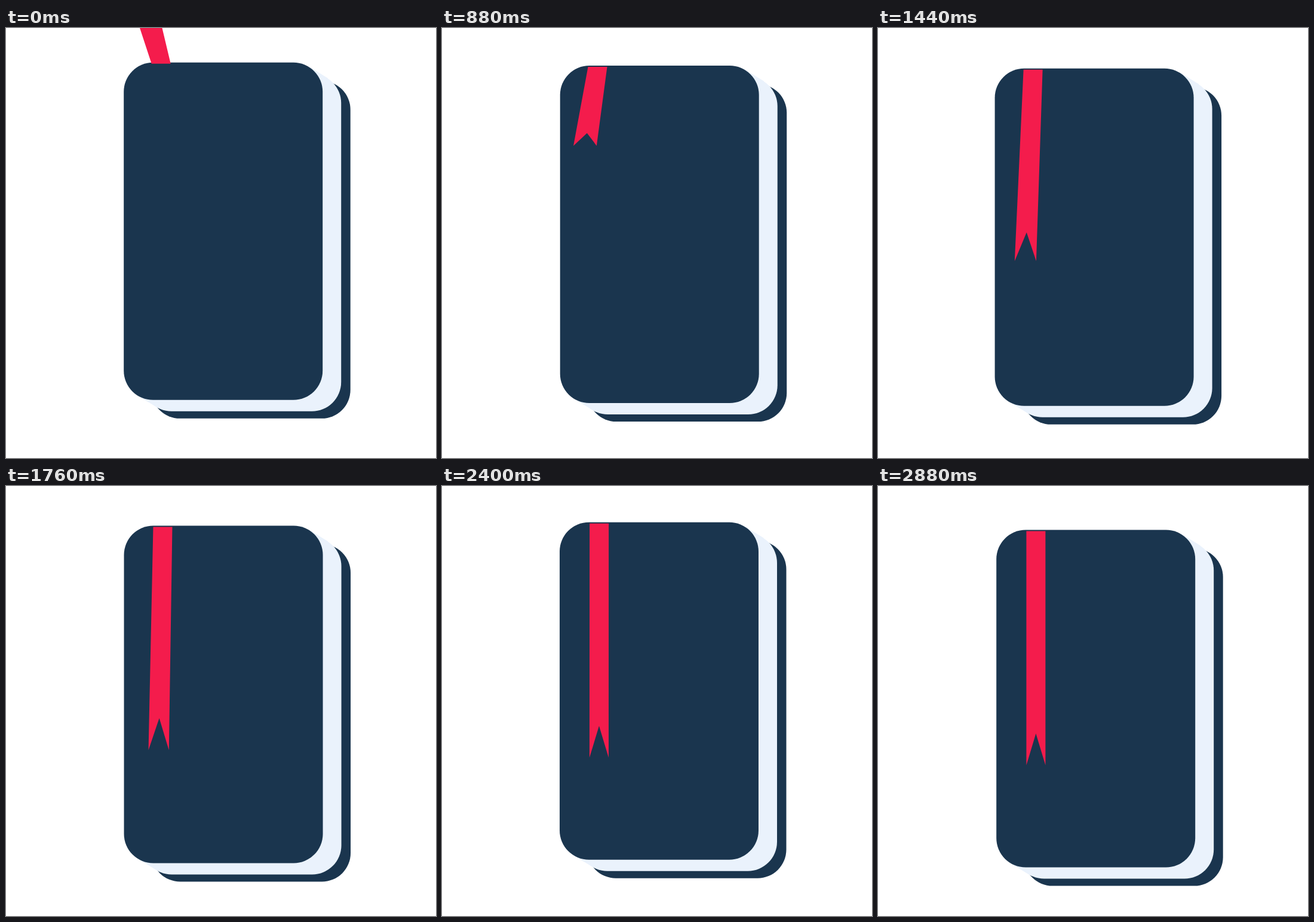
Recreate the animation shown at these times as an HTML page. Size 720 px wide and 720 px high, loop 2960 ms.

```html
<!DOCTYPE html>
<html lang="en">
<head>
<meta charset="utf-8">
<title>Notebook with ribbon</title>
<style>
  html, body { margin: 0; width: 100%; height: 100%; overflow: hidden; background: #fff; }
  svg { display: block; width: 100vw; height: 100vh; }
  .cover { fill: #1a354e; }
  .pages { fill: #eaf2fc; }
  .ribbon { fill: #f41c4c; }
</style>
</head>
<body>
<svg viewBox="0 0 720 720">
  <g id="book">
    <rect class="cover" x="46" y="31" width="333.5" height="565" rx="48"/>
    <rect class="pages" x="31" y="19" width="333" height="565" rx="49"/>
    <path class="pages" d="M23.4 557.8 54.4 576.8 341.6 26.2 310.6 7.2Z"/>
    <rect class="cover" width="333" height="565" rx="49"/>
  </g>
  <polygon id="ribbon" class="ribbon"/>
</svg>
<script>
const LOOP = 2960, STEP = 80;
const RIBBON = { width: 32, length: 392, notch: 339 };
const CAMERA = { center: 360, distance: 2045 };
const FALL = { from: 91.5, duration: 2520 };

// The book drifts through these evenly spaced positions.
const DRIFT_STEP = 480;
const driftX = [197.2, 201.9, 197, 195.6, 198.3, 197, 198.2];
const driftY = [57.8, 56.4, 64.2, 67.8, 65.2, 60.7, 73.6];

const smoothstep = u => u * u * (3 - 2 * u);

function drift(points, t) {
  const last = points.length - 1;
  const i = Math.min(Math.floor(t / DRIFT_STEP), last - 1);
  const u = t / DRIFT_STEP - i, w = 1 - u;
  const slope = k => {
    const a = Math.max(k - 1, 0), b = Math.min(k + 1, last);
    return (points[b] - points[a]) / (b - a);
  };
  return points[i] * smoothstep(w) + points[i + 1] * smoothstep(u)
    + u * w * (slope(i) * w - slope(i + 1) * u);
}

function project(x, y, z) {
  const scale = CAMERA.distance / (CAMERA.distance - z);
  return [x, y].map(v => CAMERA.center + (v - CAMERA.center) * scale);
}

const book = document.getElementById("book");
const ribbon = document.getElementById("ribbon");

function draw(t) {
  const x = drift(driftX, t), y = drift(driftY, t);
  const fall = smoothstep(Math.min(t / FALL.duration, 1));
  const angle = FALL.from * (1 - fall) * Math.PI / 180;
  const sin = Math.sin(angle), cos = Math.cos(angle);
  const left = x + 50.2 - 3.7 * sin, top = y + 2;
  const at = (across, along) =>
    project(left + across * RIBBON.width, top + along * cos, along * sin);

  book.setAttribute("transform", `translate(${x} ${y})`);
  ribbon.setAttribute("points", [
    at(0, 0), at(1, 0), at(1, RIBBON.length), at(0.5, RIBBON.notch), at(0, RIBBON.length)
  ].join(" "));
}

const start = performance.now();
function tick() {
  const t = (performance.now() - start) % LOOP;
  draw(Math.floor(t / STEP) * STEP);
  requestAnimationFrame(tick);
}
tick();
</script>
</body>
</html>
```
